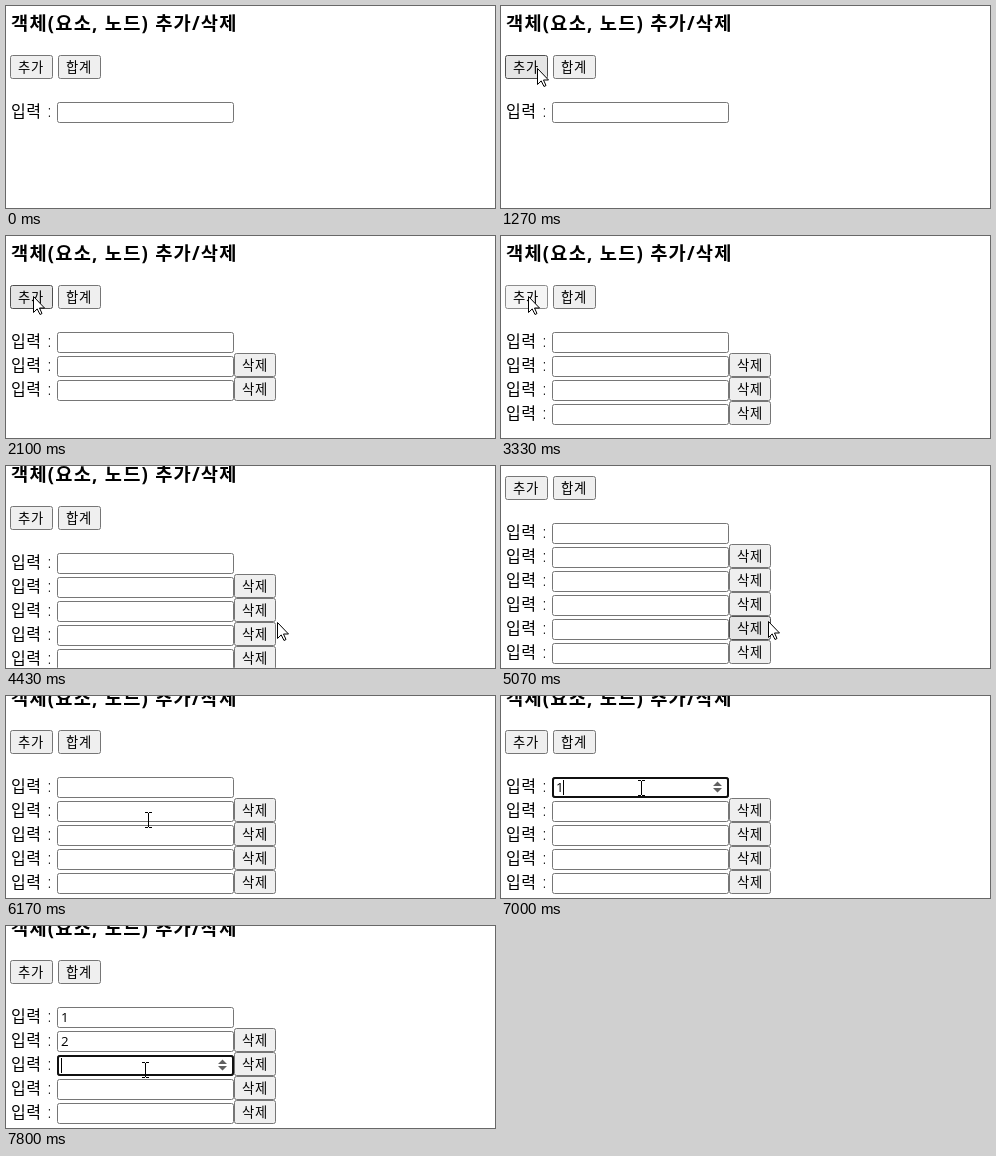
An HTML page for the animation above (8000 ms loop, 489 px wide and 202 px high).

```html
<!DOCTYPE html>
<html lang="ko">
<head>
<meta charset="utf-8">
<title>객체 추가/삭제</title>
<style>
html, body { margin: 0; width: 100%; height: 100%; overflow: hidden; background: #fff; }
svg { display: block; }
text { font: 350 13.33px "Open Sans", "Noto Sans CJK KR", "Noto Sans CJK", sans-serif; }
.title { font-size: 18.7px; font-weight: bold; letter-spacing: 1.2px; }
.label { font-size: 16px; letter-spacing: .5px; word-spacing: 1.3px; }
.value { font-weight: 400; }
.btn text { letter-spacing: .8px; }
.btn rect { fill: #efefef; stroke: #767676; }
.btn.hover rect { fill: #e5e5e5; stroke: #4f4f4f; }
.btn.down rect { fill: #f5f5f5; stroke: #8d8d8d; }
.box { fill: #fff; stroke: #767676; }
.focus { fill: none; stroke: #101010; stroke-width: 2; }
.spin { fill: #606060; }
</style>
</head>
<body>
<svg width="489" height="202" viewBox="0 0 489 202">
  <g id="page"><text class="title" x="5" y="24">객체(요소, 노드) 추가/삭제</text></g>
  <path id="arrow" fill="#fff" stroke="#000" d="M.5 .5V16.5L4.2 12.9 7 18.5 9 17.5 6.5 12H11.5Z"/>
  <path id="beam" fill="none" stroke="#000" d="M-3-7.5H0M1-7.5H4M.5-7V7M-3 7.5H0M1 7.5H4"/>
</svg>
<script>
const LOOP = 8000, ENTER = 600, ROW = 24;
const $ = id => document.getElementById(id);
const page = $('page'), arrow = $('arrow'), beam = $('beam');

// Pointer strokes: start, duration, destination x and y
const start = [446, 169];
const strokes = [
  [ENTER, 785, 27, 60],
  [4230, 200, 271, 156], [4430, 300, 315, 161],
  [4900, 170, 267, 155], [5070, 260, 250, 136],
  [5970, 200, 142, 124], [6170, 230, 140, 114],
  [6660, 100, 140, 92], [7160, 150, 138, 119], [7580, 200, 139, 144]
];
const addClicks = [[1570, 1600], [2070, 2100], [2570, 2630], [3330, 3400], [3900, 3970]];
const removeClick = [5530, 5670];
const focusTimes = [6770, 7330, 7790];
const typeTimes = [7000, 7530];

const easeOut = p => 1 - (1 - Math.min(1, Math.max(0, p))) ** 2;
const during = ([from, to], t) => t >= from && t < to;

function pointerAt(t) {
  let [x, y] = start;
  for (const [begin, length, tx, ty] of strokes) {
    const p = easeOut((t - begin) / length);
    x += (tx - x) * p;
    y += (ty - y) * p;
  }
  return [Math.round(x), Math.round(y)];
}

function add(parent, tag, attrs, text = '') {
  const el = document.createElementNS('http://www.w3.org/2000/svg', tag);
  for (const k in attrs) el.setAttribute(k, attrs[k]);
  el.textContent = text;
  parent.append(el);
  return el;
}

function addButton(parent, x, y, w, label) {
  const el = add(parent, 'g', { class: 'btn' });
  add(el, 'rect', { x: x + .5, y: y + .5, width: w - 1, height: 23, rx: 2 });
  add(el, 'text', { x: x + 8, y: y + 17 }, label);
  return { el, x, y, w, h: 24 };
}

function addRow(i) {
  const x = 51, y = 96 + ROW * i, w = 177, h = 21;
  const el = add(page, 'g', {});
  add(el, 'text', { class: 'label', x: 5, y: y + 15 }, '입력 :');
  add(el, 'rect', { class: 'box', x: x + .5, y: y + .5, width: w - 1, height: h - 1, rx: 2 });
  return {
    el, x, y, w, h,
    button: i ? addButton(el, x + w, y - 3, 42, '삭제') : null,
    value: add(el, 'text', { class: 'value', x: x + 4, y: y + 15 }),
    ring: add(el, 'rect', { class: 'focus', x: x + 1, y: y + 1, width: w - 2, height: h - 2, rx: 2 }),
    caret: add(el, 'rect', { y: y + 3, width: 1, height: 15 }),
    spin: add(el, 'path', { class: 'spin', d: `M212 ${y + 9}l4.5-4.5 4.5 4.5zM212 ${y + 11}l4.5 4.5 4.5-4.5z` })
  };
}

const addBox = addButton(page, 4, 49, 43, '추가');
addButton(page, 52, 49, 43, '합계');
const rows = [0, 1, 2, 3, 4, 5].map(addRow);

const show = (el, on) => el.setAttribute('display', on ? 'inline' : 'none');
const move = (el, x, y) => el.setAttribute('transform', `translate(${x} ${y})`);

function draw(t) {
  const present = t >= ENTER;
  const count = 1 + addClicks.filter(c => t >= c[1]).length - (t >= removeClick[1]);
  const focused = focusTimes.filter(f => t >= f).length - 1;
  const [x, y] = pointerAt(t);
  // Scrolling stops at the end of the page, which shrinks with each removed row.
  const scroll = Math.round(Math.min(39 * easeOut((t - 4400) / 240), Math.max(0, count * ROW - 105)));
  const over = b => present && x >= b.x && x < b.x + b.w && y + scroll >= b.y && y + scroll < b.y + b.h;
  const setButton = (b, pressed) =>
    b.el.setAttribute('class', 'btn' + (over(b) ? pressed ? ' down' : ' hover' : ''));

  move(page, 0, -scroll);
  setButton(addBox, addClicks.some(c => during(c, t)));
  rows.forEach((row, i) => {
    const text = t >= typeTimes[i] ? i + 1 : '';
    show(row.el, i < count);
    if (row.button) setButton(row.button, during(removeClick, t));
    row.value.textContent = text;
    row.caret.setAttribute('x', text ? 62 : 55);
    for (const part of [row.ring, row.caret, row.spin]) show(part, i === focused);
  });

  const inInput = rows.slice(0, count).some(over);
  show(arrow, present && !inInput);
  show(beam, inInput);
  move(arrow, x, y);
  move(beam, x, y);
}

function tick() {
  draw(performance.now() % LOOP);
  requestAnimationFrame(tick);
}
tick();
</script>
</body>
</html>
```
